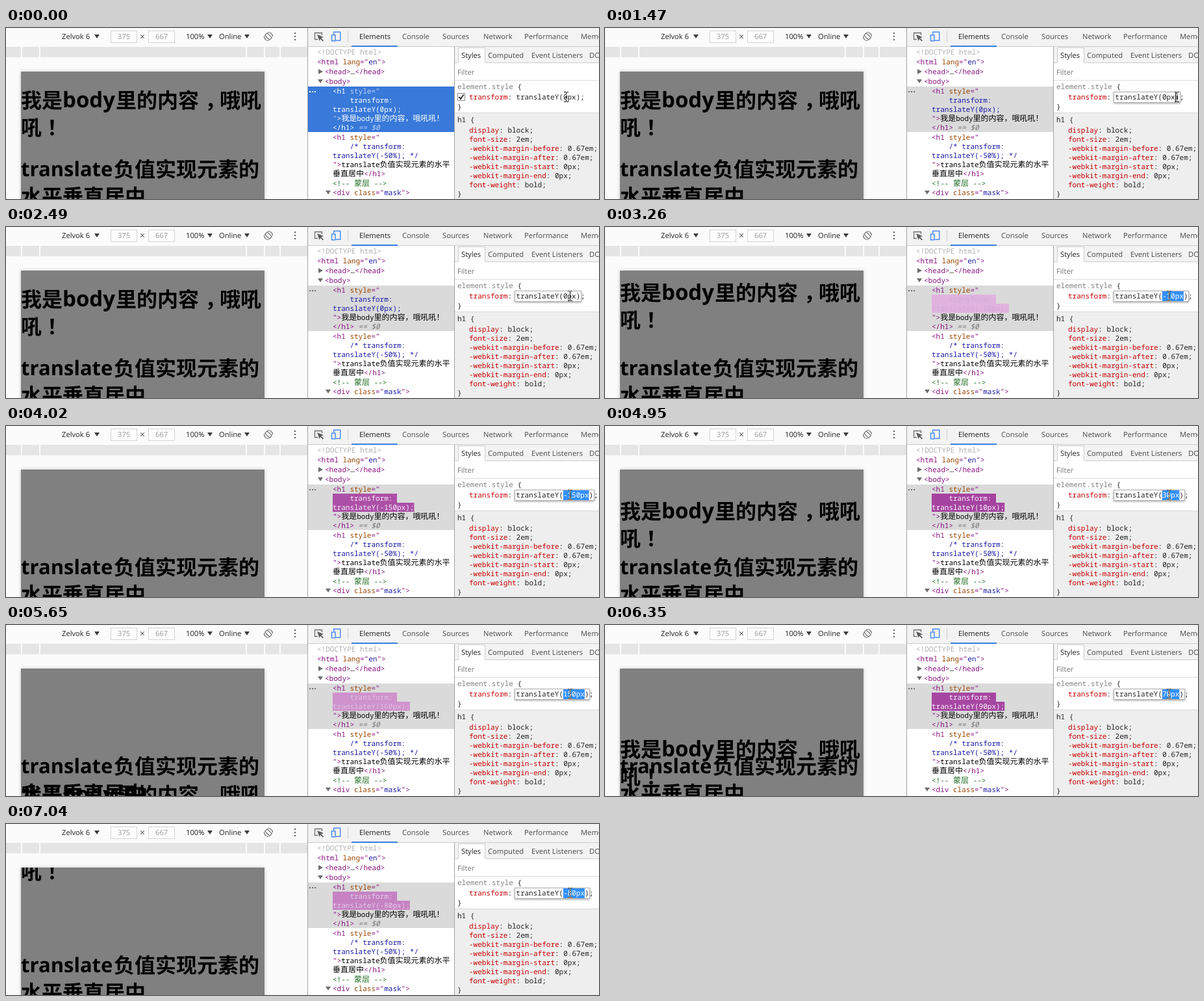
An HTML page with a canvas that plays this animation: 913x263 px, repeating every 7.13 s.

```html
<!DOCTYPE html>
<html lang="en">
<head>
<meta charset="utf-8">
<title>translateY in the inspector</title>
<style>
html, body { margin: 0; width: 100%; height: 100%; overflow: hidden; background: #fff; }
canvas { display: block; }
</style>
</head>
<body>
<canvas id="stage" width="913" height="263"></canvas>
<script>
const ctx = document.getElementById('stage').getContext('2d');
ctx.textRendering = 'geometricPrecision';

const LOOP = 7130;
const HAN = '"Noto Sans CJK SC", "Noto Sans CJK", sans-serif';
const UI = '11.2px "Open Sans", "Noto Sans", sans-serif';
const MONO = '11px "Noto Sans Mono", "DejaVu Sans Mono", monospace';
const TAG = '#881280', ATTR = '#994500', VALUE = '#1a1aa6', PROP = '#c80000';
const INK = '#222', GRAY = '#808080', LINE = '#ccc', SPLIT = '#a3a3a3', BAR = '#f3f3f3';

// Screen refreshes: [first, last, count]
const TICKS = [
  [0], [760], [930], [1080, 1160, 2], [1470], [1620], [1770, 1940, 3], [2090], [2490],
  [2790, 3110, 5], [3260, 3960, 10], [4020, 4250, 4], [4420, 5110, 10], [5190, 5880, 10],
  [5950], [6120, 6810, 10], [6890, 7040, 3]
].flatMap(([a, b = a, n = 1]) => Array.from({ length: n }, (_, i) =>
  a + (n > 1 ? Math.floor((b - a) * i / (n - 1) / 10) * 10 : 0)));

// Held arrow keys: press time, change per key event, number of events
const KEYS = [[2765, -10, 16], [3925, 10, 32], [5625, -10, 24]];
const DELAY = 500, REPEAT = 30.5;

// Pointer x from a given time on
const POINTER = [[0, 862], [1080, 875], [1160, 880], [1620, 875], [1850, 874],
  [1940, 871], [2090, 868]];
// Visible caret: from, to, x
const CARET = [[1470, 1620, 878], [2090, 2490, 872]];

function offsetAt(t) {
  let value = 0, changed = -1;
  for (const [press, step, max] of KEYS) {
    if (t < press) break;
    const repeats = Math.floor((t - press - DELAY) / REPEAT) + 1;
    const n = Math.min(max, 1 + Math.max(0, repeats));
    value += n * step;
    changed = n === 1 ? press : press + DELAY + (n - 2) * REPEAT;
  }
  return { value, changed };
}

// cubic-bezier(0, 0, .2, 1)
function easeOut(x) {
  if (x >= 1) return 1;
  let lo = 0, hi = 1;
  for (let i = 0; i < 20; i++) {
    const s = (lo + hi) / 2;
    if (0.6 * s * s + 0.4 * s * s * s < x) lo = s; else hi = s;
  }
  return 3 * lo * lo - 2 * lo * lo * lo;
}

const mix = (a, b, k) => `rgb(${a.map((v, i) => Math.round(v + (b[i] - v) * k))})`;

function box(x, y, w, h, fill) {
  ctx.fillStyle = fill;
  ctx.fillRect(x, y, w, h);
}

function frame(x, y, w, h, color) {
  ctx.strokeStyle = color;
  ctx.lineWidth = 1;
  ctx.strokeRect(x + 0.5, y + 0.5, w - 1, h - 1);
}

function text(s, x, y, color = INK, font = UI) {
  ctx.font = font;
  ctx.fillStyle = color;
  ctx.fillText(s, x, y);
  return x + ctx.measureText(s).width;
}

// Runs of code on one line: text, colour, text, colour ...
function code(x, y, ...runs) {
  for (let i = 0; i < runs.length; i += 2) {
    for (const part of runs[i].split(/([\u3000-\uffef]+)/)) {
      if (part) x = text(part, x, y, runs[i + 1], part[0] >= '\u3000' ? '12px ' + HAN : MONO);
    }
  }
  return x;
}

function width(s) {
  ctx.font = MONO;
  return ctx.measureText(s).width;
}

function poly(color, ...p) {
  ctx.fillStyle = color;
  ctx.beginPath();
  for (let i = 0; i < p.length; i += 2) ctx.lineTo(p[i], p[i + 1]);
  ctx.fill();
}

const down = (x, y, color = '#6e6e6e') => poly(color, x - 4, y - 3, x + 4, y - 3, x, y + 3);

function dots(x, y, dx, dy, color) {
  for (let i = -1; i <= 1; i++) box(x + i * dx - 1, y + i * dy - 1, 2, 2, color);
}

function deviceBar() {
  box(0, 0, 464, 29, '#fbfbfb');
  text('Zelvok 6', 86, 17);
  text('100%', 277, 17);
  text('Online', 328, 17);
  [140, 314, 371].forEach(x => down(x, 13, '#3c3c3c'));
  [[161, '375'], [219, '667']].forEach(([x, s]) => {
    box(x, 4, 41, 19, '#fdfdfd');
    frame(x, 4, 41, 19, '#d4d4d4');
    text(s, x + 11, 17, '#999');
  });
  text('×', 206, 18, '#555', '14px "Open Sans", sans-serif');
  dots(445, 13, 0, 5, '#5a5a5a');

  ctx.save();
  ctx.translate(404, 13);
  ctx.rotate(-Math.PI / 4);
  ctx.strokeStyle = '#6e6e6e';
  ctx.lineWidth = 1.2;
  ctx.strokeRect(-2.5, -5, 5, 10);
  ctx.beginPath();
  ctx.arc(0, 0, 6.5, -0.9, 0.8);
  ctx.moveTo(-4.5, 4.7);
  ctx.arc(0, 0, 6.5, 2.3, 4);
  ctx.stroke();
  ctx.restore();

  box(0, 29, 464, 16, '#e5e5e5');
  [23, 51, 369, 397, 421].forEach(x => box(x, 29, 2, 16, '#fbfbfb'));
}

function page(dy) {
  box(0, 45, 464, 218, '#fbfbfb');
  ctx.save();
  ctx.shadowColor = 'rgba(0,0,0,.2)';
  ctx.shadowBlur = 6;
  box(23, 67, 375, 200, '#808080');
  ctx.restore();

  ctx.save();
  ctx.beginPath();
  ctx.rect(23, 67, 375, 196);
  ctx.clip();
  const han = (s, x, y) => text(s, x, y + 1, '#000', 'bold 32px ' + HAN);
  const latin = (s, x, y, size) => text(s, x, y, '#000', `bold ${size}px "Open Sans", "Noto Sans", sans-serif`);
  han('我是', 23, 122 + dy);
  latin('body', 87, 122 + dy, 33);
  han('里的内容', 169, 122 + dy);
  // punctuation sits in the middle of its cell
  han('，', 306, 122 + dy);
  han('哦吼', 329, 122 + dy);
  han('吼', 23, 164 + dy);
  han('！', 63, 164 + dy);
  latin('translate', 23, 228, 31);
  han('负值实现元素的', 166, 228);
  han('水平垂直居中', 23, 270);
  ctx.restore();
}

function toolsBar() {
  box(464, 0, 1, 263, SPLIT);
  box(465, 0, 448, 28, BAR);
  box(465, 28, 448, 1, LINE);

  ctx.strokeStyle = '#6e6e6e';
  ctx.lineWidth = 1.3;
  ctx.beginPath();
  ctx.moveTo(480, 17.5);
  ctx.lineTo(475.5, 17.5);
  ctx.lineTo(475.5, 7.5);
  ctx.lineTo(486.5, 7.5);
  ctx.lineTo(486.5, 11);
  ctx.stroke();
  poly('#5a5a5a', 479, 10, 489, 14, 485.2, 15.4, 489, 19.2, 487.6, 20.5, 484, 16.7, 482.6, 20);

  ctx.strokeStyle = '#4285f4';
  ctx.lineWidth = 1.4;
  ctx.strokeRect(504.7, 6.2, 10, 13);
  box(500.5, 10, 7.5, 10.5, BAR);
  ctx.strokeRect(501.5, 11, 5.5, 8.8);

  box(526, 5, 1, 17, LINE);
  [['Elements', 544], ['Console', 610], ['Sources', 672], ['Network', 735],
    ['Performance', 798], ['Memory', 885]].forEach(([s, x], i) => text(s, x, 17, i ? '#4a4a4a' : INK));
  box(532, 27, 71, 2, '#3b7de0');
}

function tree(t) {
  const active = t < 760;
  const { value, changed } = offsetAt(t - 45);
  const pick = c => active ? '#fff' : c;
  const soft = c => active ? '#bcd3f5' : c;

  box(465, 29, 225, 234, '#fff');
  box(465, 90, 225, 70, active ? '#3879d9' : '#dadada');
  code(479, 41, '<!DOCTYPE html>', '#b0b0b0');
  code(479, 56, '<html ', TAG, 'lang', ATTR, '="', TAG, 'en', VALUE, '">', TAG);
  poly('#6e6e6e', 481, 63, 488, 67, 481, 71);
  code(491, 71, '<head>', TAG, '…', INK, '</head>', TAG);
  down(484, 82);
  code(491, 86, '<body>', TAG);
  dots(472, 98, 4, 0, pick('#6e6e6e'));

  code(503, 101, '<h1 ', pick(TAG), 'style', soft(ATTR), '="', soft(TAG));
  const move = `translateY(${value}px);`;
  let ink = pick(VALUE);
  if (changed > 0) {
    const k = easeOut((t - 45 - changed) / 1120);
    const glow = mix([158, 54, 153], [245, 219, 244], k);
    box(503, 104, 99, 14, glow);
    box(503, 118, width(move), 14, glow);
    ink = mix([255, 255, 255], [195, 140, 205], k);
  }
  code(529.4, 115, 'transform:', ink);
  code(503, 129, move, ink);
  code(503, 143, '"', soft(TAG), '>', pick(TAG), '我是body里的内容，哦吼吼！', pick('#000'));
  const end = code(503, 157, '</h1>', pick(TAG));
  text(' == $0', end, 157, soft('#777'), 'italic ' + MONO);

  code(503, 172, '<h1 ', TAG, 'style', ATTR, '="', TAG);
  code(529.4, 186, '/* transform:', VALUE);
  code(503, 200, 'translateY(-50%); */', VALUE);
  code(503, 214, '">', TAG, 'translate负值实现元素的水平', '#000');
  code(503, 228, '垂直居中', '#000', '</h1>', TAG);
  code(503, 243, '<!-- 蒙层 -->', '#236e25');
  down(496, 253);
  code(503, 257, '<div ', TAG, 'class', ATTR, '="', TAG, 'mask', VALUE, '">', TAG);
}

function field(t) {
  const { value } = offsetAt(t);
  const head = 'translateY(', arg = value + 'px', x = 785.3;
  if (t < 930) {
    box(695, 100, 12, 12, '#fff');
    frame(695, 100, 12, 12, '#8a8a8a');
    ctx.strokeStyle = '#333';
    ctx.lineWidth = 2;
    ctx.beginPath();
    ctx.moveTo(697.5, 106);
    ctx.lineTo(700, 109);
    ctx.lineTo(704.5, 102.5);
    ctx.stroke();
    code(x, 110, head + arg + ');', INK);
    return;
  }
  const w = width(head + arg + ')');
  const right = Math.round(x + w + 2);
  ctx.save();
  ctx.shadowColor = 'rgba(0,0,0,.4)';
  ctx.shadowBlur = 3;
  ctx.shadowOffsetY = 1;
  box(783, 98, right - 783, 17, '#fff');
  ctx.restore();
  frame(783, 98, right - 783, 17, '#b4b4b4');
  code(right - 1, 110, ';', INK);

  const all = t < 1470, number = t >= 2790;
  const hx = x + width(head);
  if (all) box(x, 99, w, 15, '#3390ff');
  if (number) box(hx, 99, width(arg), 15, '#3390ff');
  const ink = all ? '#fff' : INK;
  code(x, 110, head, ink, arg, number ? '#fff' : ink, ')', ink);
  for (const [from, to, cx] of CARET) {
    if (t >= from && t < to) box(cx, 99, 1, 14, '#000');
  }
}

function styles(t) {
  box(690, 29, 1, 234, SPLIT);
  box(691, 29, 222, 24, BAR);
  box(691, 53, 222, 1, LINE);
  box(696, 30, 42, 24, '#fff');
  box(696, 30, 42, 1, LINE);
  box(696, 30, 1, 23, LINE);
  box(737, 30, 1, 23, LINE);
  text('Styles', 701, 46);
  [['Computed', 742], ['Event Listeners', 809], ['DOM Breakpoints', 898]]
    .forEach(([s, x]) => text(s, x, 46, '#4a4a4a'));

  box(691, 54, 222, 209, '#fff');
  text('Filter', 695, 72, '#757575');
  box(691, 80, 222, 1, '#ddd');
  code(695, 94, 'element.style', GRAY, ' {', INK);
  code(713, 110, 'transform', PROP, ':', INK);
  field(t);
  code(695, 125, '}', INK);

  box(691, 130, 222, 133, '#eee');
  box(691, 130, 222, 1, '#d8d8d8');
  code(695, 145, 'h1 {', INK);
  [['display', 'block'], ['font-size', '2em'], ['-webkit-margin-before', '0.67em'],
    ['-webkit-margin-after', '0.67em'], ['-webkit-margin-start', '0px'],
    ['-webkit-margin-end', '0px'], ['font-weight', 'bold']]
    .forEach(([k, v], i) => code(713, 161 + i * 14, k, PROP, `: ${v};`, INK));
  code(695, 259, '}', INK);
}

// The I-beam inverts what lies below it
function pointer(t) {
  const x = POINTER.filter(p => p[0] <= t).pop()[1];
  ctx.save();
  ctx.globalCompositeOperation = 'difference';
  box(x, 99, 1, 14, '#fff');
  for (const y of [98, 113]) {
    box(x - 3, y, 3, 1, '#fff');
    box(x + 1, y, 3, 1, '#fff');
  }
  ctx.restore();
}

function draw(now) {
  const time = now % LOOP;
  const t = TICKS.filter(k => k <= time).pop();
  page(offsetAt(t - 20).value);
  deviceBar();
  toolsBar();
  tree(t);
  styles(t);
  pointer(t);
}

let start;
function loop(now) {
  start ??= now;
  draw(Math.max(0, now - start));
  requestAnimationFrame(loop);
}
draw(0);
requestAnimationFrame(loop);
</script>
</body>
</html>
```
